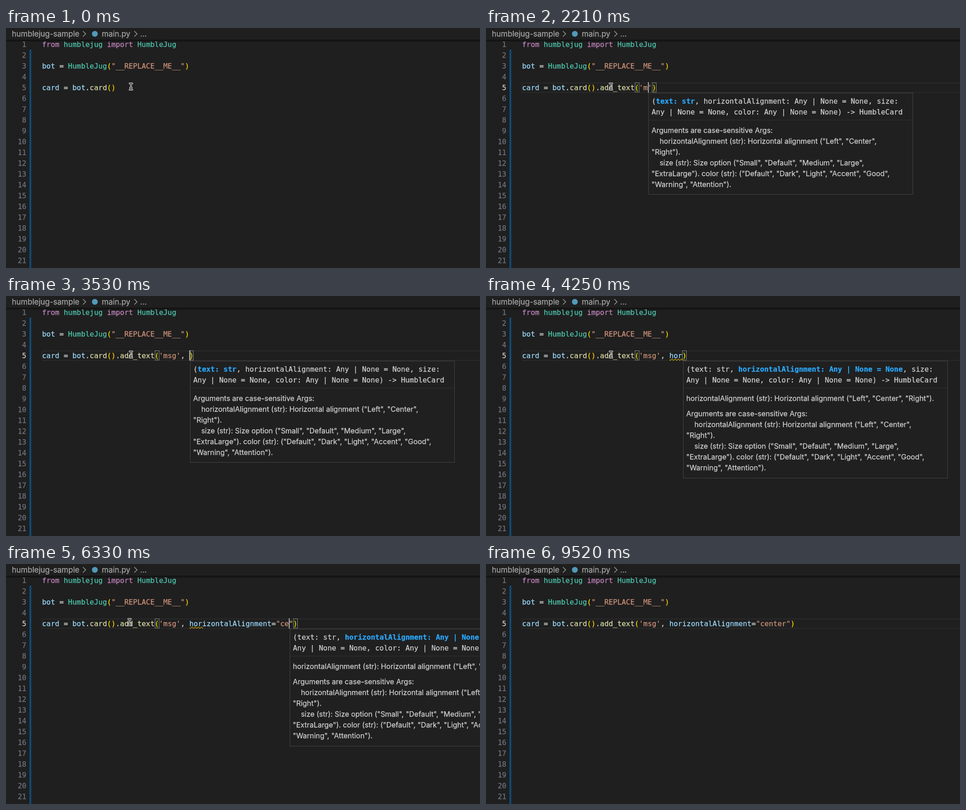
An HTML page with a canvas for the animation above (9.62 s loop, 1051 px wide and 533 px high).

```html
<!DOCTYPE html>
<html lang="en">
<head>
<meta charset="utf-8">
<title>Code editor</title>
<style>
html, body { margin: 0; width: 100%; height: 100%; overflow: hidden; background: #1f1f1f; }
canvas { display: block; }
</style>
</head>
<body>
<canvas id="stage" width="1051" height="533"></canvas>
<script>
const ctx = document.getElementById('stage').getContext('2d');
const W = 1051, H = 533, LOOP = 9620;
const CH = 9.6, X0 = 80, ROW = 24, TOP = 144;
const MONO = '15.946px "DejaVu Sans Mono", monospace';
const SANS = 'Inter, "Liberation Sans", sans-serif';
const C = {
  bg: '#1f1f1f', box: '#202020', edge: '#454545', text: '#d2d2d2', dim: '#6e7681',
  key: '#c586c0', type: '#4ec9b0', name: '#9cdcfe', str: '#ce9178', fn: '#dcdcaa',
  gold: '#ffd700', blue: '#569cd6', hit: '#2aaaff', cube: '#b180d7'
};

// Text after "card = bot.card()"; the bar marks the caret
const EDITS = [
  [0, '|'], [540, '.|'], [660, '.a|'], [840, '.ad|'], [960, '.add|'],
  [1380, '.add_text|'], [1680, '.add_text(|)'], [1970, ".add_text('|')"],
  [2210, ".add_text('m|')"], [2450, ".add_text('ms|')"], [2510, ".add_text('msg|')"],
  [2930, ".add_text('msg'|)"], [3350, ".add_text('msg',|)"], [3530, ".add_text('msg', |)"],
  [3650, ".add_text('msg', h|)"], [3770, ".add_text('msg', ho|)"], [3890, ".add_text('msg', hor|)"]
];
const named = ".add_text('msg', horizontalAlignment=";
EDITS.push([5140, named + '|)']);
[[5800, ''], [6160, 'c'], [6260, 'ce'], [6380, 'cen'], [6440, 'cent'], [6910, 'cente'], [7030, 'center']]
  .forEach(([t, s]) => EDITS.push([t, named + '"' + s + '|")']));

const CARET_OFF = [[0, 180], [4250, 4790], [7570, 8110], [8700, 9160], [9520, LOOP]];
const MOUSE = [
  [0, 277, 130], [5080, 277, 130], [5260, 259, 128], [5500, 274, 129], [6850, 274, 129],
  [7210, 355, 161], [7450, 355, 161], [7510, 363, 168], [7810, 574, 271], [7930, 574, 271],
  [8520, 1022, 503], [8640, 1022, 503], [9160, 1026, 548], [LOOP, 1026, 548]
];
const MEMBERS = ['add_text', 'add_action', 'add_image', 'add_subcard',
  'add_subtitle', 'add_table', 'add_title', 'addLink'];
const ARGS = [
  'Arguments are case-sensitive Args:',
  '    horizontalAlignment (str): Horizontal alignment ("Left", "Center",',
  '"Right").',
  '    size (str): Size option ("Small", "Default", "Medium", "Large",',
  '"ExtraLarge"). color (str): ("Default", "Dark", "Light", "Accent", "Good",',
  '"Warning", "Attention").'
];
const NARROW = [
  'Arguments are case-sensitive Args:',
  '    horizontalAlignment (str): Horizontal',
  'alignment ("Left", "Center", "Right").',
  '    size (str): Size option ("Small", "Default",',
  '"Medium", "Large", "ExtraLarge"). color',
  '(str): ("Default", "Dark", "Light", "Accent",',
  '"Good", "Warning", "Attention").'
];

const within = (t, a, b) => t >= a && t < b;
const colX = k => X0 + k * CH;

function rect(x, y, w, h, color) {
  ctx.fillStyle = color;
  ctx.fillRect(x, y, w, h);
}

// A hairline outline gives the slightly heavy look of smoothed light text
function ink(s, x, y, color) {
  ctx.fillStyle = ctx.strokeStyle = color;
  ctx.lineWidth = .25;
  ctx.fillText(s, x, y);
  ctx.strokeText(s, x, y);
}

// Parts are [text, colour, bold]
function code(x, y, parts) {
  for (const [s, color, bold] of parts) {
    ctx.font = (bold ? 'bold ' : '') + MONO;
    ink(s, x, y, color || C.text);
    x += s.length * CH;
  }
}

function sans(s, x, y, size = 15.95, color = C.text) {
  ctx.font = size + 'px ' + SANS;
  ink(s, x, y, color);
}

function panel(x, y, w, h) {
  rect(x, y, w, h, C.box);
  ctx.strokeStyle = C.edge;
  ctx.lineWidth = 1;
  ctx.strokeRect(x + .5, y + .5, w - 1, h - 1);
}

function line(color, width, ...pts) {
  ctx.strokeStyle = color;
  ctx.lineWidth = width;
  ctx.beginPath();
  pts.forEach(([x, y], i) => i ? ctx.lineTo(x, y) : ctx.moveTo(x, y));
  ctx.stroke();
}

function gutter(active) {
  for (let n = 1; n <= 21; n++) {
    const s = String(n);
    code(45.2 - s.length * CH, n * ROW + 17.5, [[s, active && n === 5 ? C.text : C.dim]]);
  }
  ctx.save();
  ctx.beginPath();
  ctx.rect(52, 48, 4, H - 48);
  ctx.clip();
  for (let y = 44; y < H + 8; y += 4) line('#0078d4', 1.5, [51, y + 5], [57, y - 1]);
  ctx.restore();
}

function tail(s) {
  return (s.match(/"[^"]*"|'[^']*'|[()]|\w+|./g) || []).map(w => [w,
    /^["']/.test(w) ? C.str : /[()]/.test(w) ? C.gold :
    w === 'add_text' ? C.fn : w[0] === 'h' ? C.name : C.text]);
}

function bracket(k) {
  const x = Math.round(colX(k)) + .5;
  rect(x, 121.5, 9, 21, 'rgba(0,100,0,.1)');
  ctx.strokeStyle = '#888888';
  ctx.lineWidth = 1;
  ctx.strokeRect(x, 121.5, 9, 21);
}

function source(t, text) {
  code(X0, 41.5, [['from ', C.key], ['humblejug ', C.type], ['import ', C.key], ['HumbleJug', C.type]]);
  code(X0, 89.5, [['bot', C.name], [' = '], ['HumbleJug', C.type], ['(', C.gold],
    ['"__REPLACE__ME__"', C.str], [')', C.gold]]);
  if (t >= 180) {
    ctx.strokeStyle = '#292929';
    ctx.lineWidth = 2;
    ctx.strokeRect(80, 122, W, 21);
  }
  if (within(t, 240, 540)) [15, 16].forEach(bracket);
  if (within(t, 1680, 9520)) [26, 16 + text.length].forEach(bracket);
  code(X0, 137.5, [['card', C.name], [' = '], ['bot', C.name], ['.'], ['card', C.fn],
    ['()', C.gold], ...tail(text)]);
  if (within(t, 4250, 6680)) {
    const wave = [];
    for (let x = 407; x <= 437; x++) wave.push([x, 141.5 + 1.5 * Math.sin((x - 407) * Math.PI / 3.5)]);
    line('#cca700', 1.2, ...wave);
  }
}

function bulb() {
  ctx.fillStyle = '#ffcc00';
  ctx.beginPath();
  ctx.arc(90.5, 104.5, 6.3, Math.PI * .78, Math.PI * .22);
  ctx.lineTo(93.3, 112);
  ctx.lineTo(87.7, 112);
  ctx.fill();
  rect(87.7, 112.8, 5.6, 2.8, '#ffcc00');
}

function cube(x, y, color) {
  line(color, 1.3, [x, y - 8], [x + 7.3, y - 4.4], [x + 7.3, y + 4.4], [x, y + 8],
    [x - 7.3, y + 4.4], [x - 7.3, y - 4.4], [x, y - 8], [x + 7.3, y - 4.4]);
  line(color, 1.3, [x - 7.3, y - 4.4], [x, y - .8], [x + 7.3, y - 4.4]);
  line(color, 1.3, [x, y - .8], [x, y + 8]);
}

function suggest(col, typed) {
  const x = Math.round(282.5 + (col - 21) * CH);
  panel(x, TOP, 574, 197);
  rect(x + 1, TOP + 1, 572, 24, '#04395e');
  MEMBERS.forEach((m, i) => {
    const y = 157 + i * ROW, plain = i ? C.text : '#ffffff';
    cube(x + 13.5, y, i ? C.cube : '#ffffff');
    code(x + 29, y + 5.5, [[m.slice(0, typed), C.hit, true], [m.slice(typed), plain]]);
  });

  const d = x + 573, tx = d + 7;
  panel(d, TOP, 590, 350);
  const optional = n => [['    ' + n, C.name], [': Any | '], ['None', C.blue], [' = '], ['None', C.blue], [',']];
  [
    [['def ', C.blue], ['add_text', C.fn], ['(']],
    [['    text', C.name], [': '], ['str', C.type], [',']],
    optional('horizontalAlignment'), optional('size'), optional('color').slice(0, -1),
    [[') -> HumbleCard']]
  ].forEach((parts, i) => code(tx, 168 + i * ROW, parts));
  rect(d + 7, 302.5, 576, 1.5, '#bdbdbd');
  NARROW.forEach((s, i) => sans(s, d + 7, 338.5 + i * ROW));
}

function signature(col, second) {
  const x = Math.min(653, Math.round(360 + (col - 29) * CH)), tx = x + 7.2;
  panel(x, TOP, 587, second ? 261 : 226);
  const first = 'text: str', align = 'horizontalAlignment: Any | None = None';
  code(tx, 168, [['('], [first, second ? C.text : C.hit, !second], [', '],
    [align, second ? C.hit : C.text, second], [', size:']]);
  code(tx, 192, [['Any | None = None, color: Any | None = None) -> HumbleCard']]);
  rect(x + 1, 204, 585, 1, '#333333');
  if (second) sans('horizontalAlignment (str): Horizontal alignment ("Left", "Center", "Right").', x + 7, 232.5);
  ARGS.forEach((s, i) => sans(s, x + 7, (second ? 267.3 : 232.5) + i * ROW));
}

function header() {
  rect(0, 0, W, 27, C.bg);
  const shade = ctx.createLinearGradient(0, 26, 0, 32);
  shade.addColorStop(0, 'rgba(0,0,0,.5)');
  shade.addColorStop(1, 'rgba(0,0,0,0)');
  rect(0, 26, W, 6, shade);
  const gray = '#a9a9a9';
  sans('humblejug-sample', 13, 19, 17, gray);
  sans('main.py', 212.5, 19, 17, gray);
  sans('...', 297.5, 19, 17, gray);
  for (const x of [170.5, 284.5]) line(gray, 1.3, [x, 7], [x + 6.3, 13], [x, 19]);
  ctx.fillStyle = '#519aba';
  ctx.beginPath();
  ctx.arc(197, 13, 6.5, 0, 7);
  ctx.fill();
}

function pointer(t) {
  const i = MOUSE.findIndex(m => m[0] > t);
  const [t0, x0, y0] = MOUSE[i - 1], [t1, x1, y1] = MOUSE[i];
  const p = (t - t0) / (t1 - t0), e = p * p * (3 - 2 * p);
  const x = x0 + (x1 - x0) * e, y = y0 + (y1 - y0) * e;
  ctx.lineCap = 'round';
  for (const [color, w] of [['#e8e8e8', 3.6], ['#1a1a1a', 1.3]]) {
    line(color, w, [x, y - 5.5], [x, y + 5.5]);
    line(color, w, [x - 3, y - 7], [x - 1, y - 6.7], [x, y - 5.5], [x + 1, y - 6.7], [x + 3, y - 7]);
    line(color, w, [x - 3, y + 7], [x - 1, y + 6.7], [x, y + 5.5], [x + 1, y + 6.7], [x + 3, y + 7]);
    line(color, w, [x - 1.8, y + 2.8], [x + 1.8, y + 2.8]);
  }
  ctx.lineCap = 'butt';
}

function draw(t) {
  const edit = EDITS.filter(e => e[0] <= t).pop()[1];
  const col = 17 + edit.indexOf('|');
  rect(0, 0, W, H, C.bg);
  gutter(t >= 180);
  source(t, edit.replace('|', ''));
  if (within(t, 4550, 5800)) bulb();
  if (!CARET_OFF.some(([a, b]) => within(t, a, b))) {
    rect(Math.round(colX(col) + .2), 120.5, 2, 23, '#aeafad');
  }
  if (within(t, 600, 1380)) suggest(col, col - 18);
  if (within(t, 1740, 9520)) signature(col, t >= 3590);
  header();
  if (t < 9160) pointer(t);
}

const start = performance.now();
function tick() {
  draw((performance.now() - start) % LOOP);
  requestAnimationFrame(tick);
}
tick();
</script>
</body>
</html>
```
